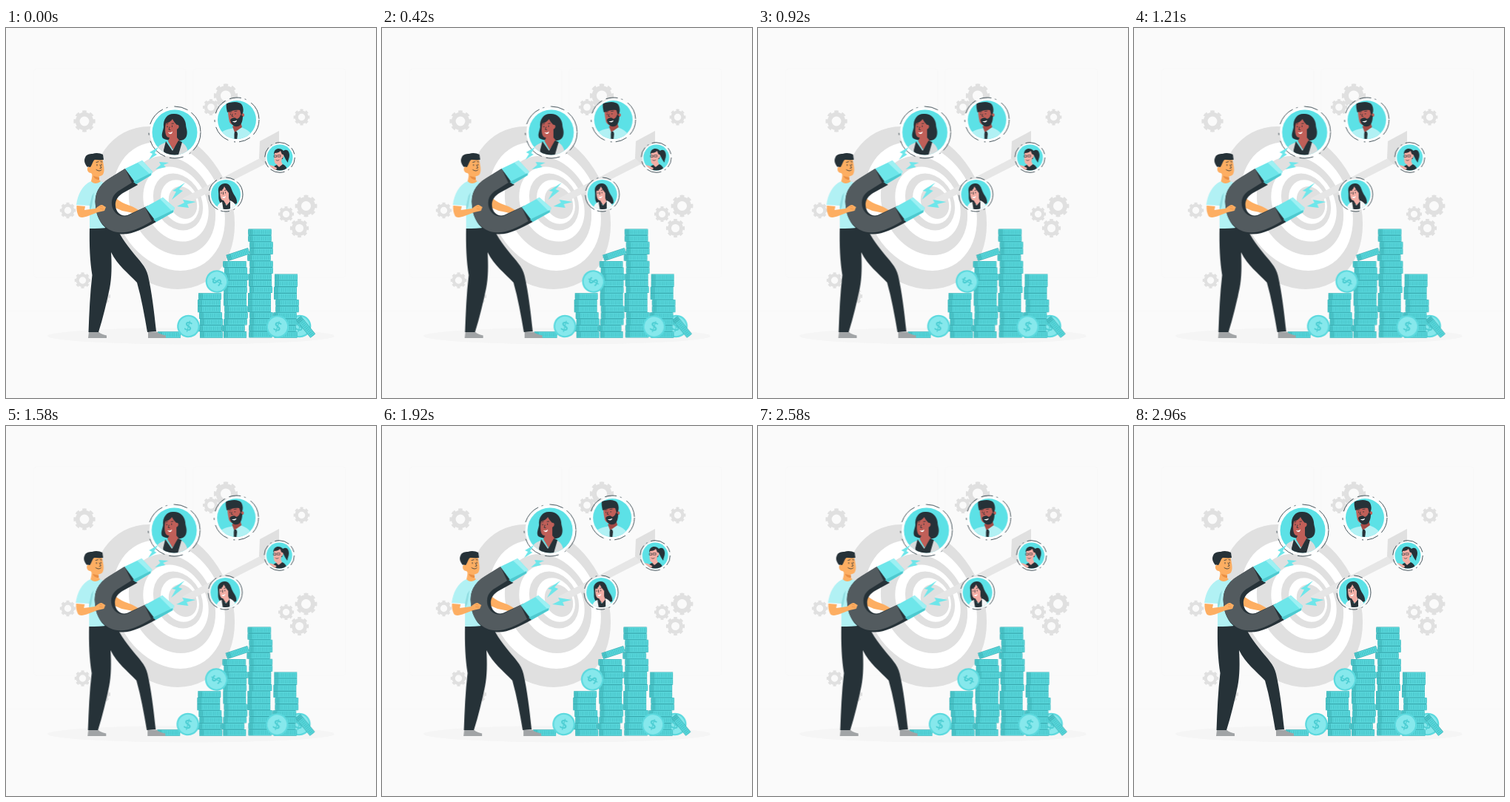
Animation of 500 by 500 pixels, one loop 3000 ms. Source, as an HTML page without scripts:

```html
<!DOCTYPE html>
<html lang="en">
<head>
<meta charset="utf-8">
<title>Attracting customers</title>
<style>
html, body { margin: 0; width: 100%; height: 100%; overflow: hidden; background: #fafafa; }
svg { display: block; width: 100%; height: 100%; }
.shake { animation: shake 3s cubic-bezier(.36, .07, .19, .97) infinite; }
@keyframes shake {
  0%, 100% { transform: translateX(0); }
  10%, 90% { transform: translateX(-.67px); }
  20%, 80% { transform: translateX(1.33px); }
  30%, 50% { transform: translateX(-2.67px); }
  40%, 60% { transform: translateX(2.67px); }
  70% { transform: translateX(-2.67px); animation-timing-function: linear; }
}
.grey { fill: #e0e0e0; }
.white { fill: #fff; }
.dark { fill: #263238; }
.skin { fill: #fdae62; }
.brown { fill: #c05f58; }
.pink { fill: #f3aea5; }
.cyan { fill: #5ce1e6; }
.pale { fill: #b1f1f4; }
.tip { fill: #6ee6ea; }
.gloss { fill: #9df0f3; }
.shade { fill: #4dc9cf; }
.line { fill: none; stroke: #263238; stroke-width: .8; stroke-linecap: round; }
.orbit { fill: none; stroke: #37474f; stroke-width: .9; }
.face { fill: #86e8ec; stroke: #5bd9de; stroke-width: 2.2; }
.sign { font: 600 19px "Open Sans", Arial, sans-serif; fill: #4dced3; text-anchor: middle; }
.rim { stroke: #36a8ae; stroke-width: 8.65; }
.side { stroke: #5ad8dc; stroke-width: 7.5; }
.ticks { stroke: #41bdc2; stroke-width: 5.4; stroke-dasharray: .8 1.7; }
.end { stroke: #278e94; stroke-opacity: .25; stroke-width: 7.5; stroke-dasharray: 6 99; }
</style>
</head>
<body>
<svg viewBox="0 0 500 500" xmlns="http://www.w3.org/2000/svg">
<defs>
  <g id="gear" fill="none" stroke="#e0e0e0">
    <circle r="6.4" stroke-width="4"/>
    <circle r="8.8" stroke-width="2.6" pathLength="16" stroke-dasharray="1.1 .9" stroke-dashoffset=".55"/>
  </g>
  <ellipse id="ring" rx="90" ry="115" transform="rotate(-28)"/>
  <g id="coin">
    <circle class="face" r="14.2"/>
    <text class="sign" y="6.8">$</text>
  </g>
  <path id="rows" d="M260 362.6h31m-32 8.65h31m-31 8.65h31m-29 8.65h31m-30 8.65h31m-33 8.65h31m-29 8.65h31
    M293.5 319.3h31m-29.5 8.65h31m-29.5 8.65h31m-33 8.65h31m-31 8.65h31m-31.5 8.65h31m-31 8.65h31m-29.5 8.65h31m-31 8.65h31m-32 8.65h31m-34 8.65h31m-28.5 8.65h31
    M327.5 275.8h31m-31 8.65h31m-29 8.65h31m-31 8.65h31m-34 8.65h31m-28 8.65h31m-31 8.65h31m-32.5 8.65h31m-31 8.65h31m-30 8.65h31m-33 8.65h31m-31 8.65h31m-31 8.65h31m-28.5 8.65h31m-31 8.65h31m-32 8.65h31m-31 8.65h31
    M363 336.7h31m-31 8.65h31m-32 8.65h31m-31 8.65h31m-28.5 8.65h31m-31 8.65h31m-34 8.65h31m-30 8.65h31m-33 8.65h31m-29 8.65h31
    M205 414.5h31"/>
  <path id="bar" d="M-15.5 0h31"/>
  <g id="slab">
    <use href="#bar" class="rim"/>
    <use href="#bar" class="side"/>
    <use href="#bar" class="ticks"/>
    <use href="#bar" class="end"/>
  </g>
  <clipPath id="c1"><circle cx="228" cy="141" r="30.5"/></clipPath>
  <clipPath id="c2"><circle cx="312" cy="124" r="26"/></clipPath>
  <clipPath id="c3"><circle cx="370" cy="175" r="17.5"/></clipPath>
  <clipPath id="c4"><circle cx="297" cy="225" r="20"/></clipPath>
</defs>

<!-- backdrop -->
<g fill="none" stroke="#f6f6f6" stroke-width=".6">
  <rect x="37.5" y="54.5" width="205.500" height="283" rx="5"/>
  <rect x="253" y="54.5" width="206" height="283" rx="5"/>
  <path d="M0 382.5h500"/>
</g>
<ellipse cx="250" cy="416.2" rx="194" ry="11.3" fill="#f5f5f5"/>
<use href="#gear" transform="translate(106 126) scale(1.45)"/>
<use href="#gear" transform="translate(297 91.5) scale(1.6)"/>
<use href="#gear" transform="translate(277 107) scale(1.1)"/>
<use href="#gear" transform="translate(399.5 120.5) scale(1.08)"/>
<use href="#gear" transform="translate(405.5 240.5) scale(1.48)"/>
<use href="#gear" transform="translate(378.5 251.5) scale(1.05)"/>
<use href="#gear" transform="translate(396.5 270.5) scale(1.25)"/>
<use href="#gear" transform="translate(83.5 246.5) scale(1.06)"/>
<use href="#gear" transform="translate(103.5 341) scale(1.07)"/>
<use href="#gear" transform="translate(129.5 362.5) scale(1.15)"/>

<!-- target and arrow -->
<use href="#ring" class="grey" transform="translate(213 243)"/>
<use href="#ring" class="white" transform="translate(220 241) scale(.79)"/>
<use href="#ring" class="grey" transform="translate(224.500 240) scale(.61)"/>
<use href="#ring" class="white" transform="translate(229.500 238) scale(.46)"/>
<use href="#ring" class="grey" transform="translate(232.500 235) scale(.35)"/>
<use href="#ring" class="white" transform="translate(235 235) scale(.27)"/>
<use href="#ring" class="grey" transform="translate(239 236) scale(.2)"/>
<path d="M239 230 347 174l5 9-109 55z" fill="#e6e6e6"/>
<path class="grey" d="M343 153 369 139v25l-17 21-10-9z"/>

<g class="shake">
  <!-- money -->
  <use href="#coin" transform="translate(397 403) rotate(15)"/>
  <g fill="none">
    <use href="#rows" class="rim"/>
    <use href="#rows" class="side"/>
    <use href="#rows" class="ticks"/>
    <use href="#rows" class="end"/>
    <use href="#slab" transform="translate(313.5 306) rotate(-18)"/>
    <use href="#slab" transform="translate(405 404) rotate(51)"/>
  </g>
  <use href="#coin" transform="translate(246.5 403) rotate(15)"/>
  <use href="#coin" transform="translate(285 342.5) rotate(-62)"/>
  <use href="#coin" transform="translate(367 403.5) rotate(18)"/>

  <!-- woman with a bob -->
  <circle class="white" cx="228" cy="141" r="33.5"/>
  <circle class="orbit" cx="228" cy="141" r="35" stroke-dasharray="27 5 2 9 19 6 30 8 3 12"/>
  <circle class="cyan" cx="228" cy="141" r="30.5"/>
  <g clip-path="url(#c1)">
    <path class="dark" d="M212 149c-3-4 0-9 1-15-1-11 5-18 13-18 9-1 16 5 17 14 0 5 3 9 1 16-2 6-9 7-14 6-6 0-13 0-18-3z"/>
    <path class="brown" d="M216 129c4-1 7-3 9-6 2 4 4 6 6 8 3-1 4 4 0 6v11l4 5-9 12-7-12 2-5c-6 1-7-10-5-19z"/>
    <path d="M202 174c0-12 4-16 15-20l8 11 9-12c8 3 12 8 13 21z" fill="#d9dcdd"/>
    <path class="dark" d="m216 153 9 13 8-14 5 2-6 21h-18l-1-10z"/>
    <path class="line" d="M218 132.500v1.500m6.500-2v1.500M217 130l2-.8m5 0 2.500-.3m-5.500 5-1 3.500 2 .3"/>
    <path class="white" d="M219 141c3 1 5 0 6-1.500 0 4-4 5-6 1.500z"/>
  </g>

  <!-- bearded man -->
  <circle class="white" cx="312" cy="124" r="28.5"/>
  <circle class="orbit" cx="312" cy="124" r="30" stroke-dasharray="22 6 16 5 2 8 25 7 3 9"/>
  <circle class="cyan" cx="312" cy="124" r="26"/>
  <g clip-path="url(#c2)">
    <path class="pale" d="M286 152c1-10 7-14 18-16l14-2c9 4 15 7 16 18z"/>
    <path d="m306 133 3 8 10-7-2-7z" fill="#a34a45"/>
    <path class="brown" d="M300 112c5-2 12-3 18-2l1 16c-3 7-14 8-17 1-1-5-2-10-2-15z"/>
    <circle class="brown" cx="319.500" cy="117.500" r="2.600"/>
    <path class="dark" d="M299 114c-1-5-2-9-1-12 6-2 17-4 21 2 2 4 2 8 1 11l-2 3-2-7c-6-1-11 1-17 3z"/>
    <path class="dark" d="M303 124c2-3 7-4 9-1 3-1 4-3 5-6l3 2c0 7-2 13-7 14-5 1-9-3-10-9z"/>
    <path class="white" d="M306 126c2 0 5-.5 6-1.500 0 3-4 4-6 1.500z"/>
    <path class="line" d="M303.500 116v1m6.500-1.500v1m-8-3 3-.5m4-.5 3-.3m-6 4-1 3 2 .2"/>
    <path class="dark" d="m309 140 3 0 1 3-1 9h-3.500l0-9z"/>
  </g>

  <!-- woman with a ponytail -->
  <circle class="white" cx="370" cy="175" r="19"/>
  <circle class="orbit" cx="370" cy="175" r="20.3" stroke-dasharray="14 4 2 5 20 4 9 6"/>
  <circle class="cyan" cx="370" cy="175" r="17.5"/>
  <g clip-path="url(#c3)">
    <path class="dark" d="M362 170c0-8 9-9 13-4 4-3 8 0 8 6 0 4-2 6-2 10-3-3-4-7-6-10l-1 5-5 1z"/>
    <path class="pink" d="M363 169c4 0 6-1 8-3l2 5c3-1 3 4 0 5l-1 4 2 5-7 5-1-6c-4 0-4-7-3-15z"/>
    <path class="dark" d="M360 194c0-5 2-8 6-9l3 3 5-4c4 2 6 5 7 10z"/>
    <path class="pink" d="m355 185 5 1 6 3-1 3-10-3z"/>
    <path class="line" stroke-opacity=".8" d="M362.500 172h3v2.500h-3zm5-.3h3.500v2.500h-3.500zM365 178.500c1 1 3 1 4-.2"/>
  </g>

  <!-- woman with long hair -->
  <circle class="white" cx="297" cy="225" r="21.5"/>
  <circle class="orbit" cx="297" cy="225" r="23" stroke-dasharray="18 5 2 6 12 4 24 6"/>
  <circle class="cyan" cx="297" cy="225" r="20"/>
  <g clip-path="url(#c4)">
    <path class="dark" d="M287 221c-1-7 4-11 9-11 7 0 8 6 10 11 2 5 7 9 6 16l-9 3-13-3c-4-5-2-10-3-16z"/>
    <path class="pink" d="M289 220c4-1 5-3 6-6 2 4 4 6 6 9v7l2 5-4 6-5-8c-4 0-5-6-5-13z"/>
    <path d="M285 248c0-8 2-11 7-13l6 7 5-9c6 3 9 6 9 15z" fill="#f4f6f6"/>
    <path class="dark" d="m292 235 6 5 5-6 0 13h-9z"/>
    <path class="line" d="M291 222.500v1m5.500-1.500v1m-6.500-3 2-.6m3.500 0 2-.6m-4 3v3"/>
    <path class="white" d="M292 228.500c3 0 4-1 5-2 0 3-3 5-5 2z"/>
  </g>

  <!-- sparks -->
  <g class="tip">
    <path d="m242 209-17 11 5 1-6 11 15-12-5-2z"/>
    <path d="m257 235-18-3 2 4-10 5 16 2-2-5z"/>
    <path d="m220 182-13-1 2 4-7 6 14-3-3-3z"/>
    <path d="m206 161-12 7 4 2-5 8 11-7-3-2z"/>
  </g>

  <!-- man -->
  <path d="M112 410.5c5 1 9 0 13 0 3 3 7 4 11 5v3.500h-25zM192 410.5c4 1 8 0 12 0 3 3 8 4 12 5v3.500h-24z" fill="#a1a4a6"/>
  <path class="dark" d="M113 269c8 1 21-1 36-3 3 13 13 25 23 38 8 10 17 18 20 31 5 22 8 47 11 75l-12 1c-4-23-8-46-14-67-12-13-26-23-35-41 1 17 1 35-2 49-4 19-9 40-15 59h-13.500c1-27 2-52 5-77-3-19-4-39-3.500-65z"/>
  <path class="skin" d="M147 228c5 6 14 10 23 13 4 2 8 4 13 8l-6 2-20-4-14-6z"/>
  <path class="pale" d="M115 207c5-1 9 0 13 0 9 4 14 11 21 20l-6 13-5-4c0 12 1 22 2 33-9 2-18 2-27 2v-31l-18-1c2-14 8-27 20-32z"/>
  <path d="m113 240 3-13 3-5-3 19-3 6z" fill="#8fdde1"/>
  <path class="skin" d="m116 195 10 5c-1 4 0 6 2 7-4 4-10 4-13 0 1-4 2-8 1-12z"/>
  <path d="m118 200 8 2v3c-4 0-7-2-8-5z" fill="#e98e43"/>
  <path class="skin" d="M112 182c2-8 18-11 19-2 1 6 3 13 0 18-3 4-13 3-16-2-5 0-7-7-3-9z"/>
  <path class="dark" d="M114 188c-1 0-3-1-4 0-4-5-5-9-3-13 1-4 6-5 10-5 5-2 10-1 14 1l1 7c-4 1-8 0-12 0-3 2-3 6-6 10z"/>
  <path class="line" d="M123 184.500v1.500m6-2v1.500m-7-4 3-.8m3 0 2 .3m-3 4 2 4-2 .5m-5 2c3 2 5 2 7 .2"/>

  <!-- magnet -->
  <path class="dark" d="m161 190-21 13c-15 9-21 22-19 37 1 19 13 36 31 38 16 3 32-6 51-16l-11-22-28 13c-9 2-15-4-16-12-1-9 4-14 10-18l20-11z"/>
  <path d="m161 190-21 13c-15 9-21 22-19 37 1 19 13 34 30 36 14 2 29-5 46-15l-9-19-24 12c-12 3-20-6-21-15-1-10 4-16 11-20l16-10z" fill="#535b5f"/>
  <path class="tip" d="m161 190 23-11 14 15-2 5-20 12z"/>
  <path class="gloss" d="m184 179 14 15-2 5-18-17z"/>
  <path class="shade" d="m172 208 24-12v3l-20 12z"/>
  <path class="tip" d="m188 242 24-13 16 14-2 6-23 13z"/>
  <path class="gloss" d="m212 229 16 14-2 6-18-18z"/>
  <path class="shade" d="m199 259 27-13v3l-23 13z"/>

  <!-- near arm -->
  <path class="skin" d="M95.500 240 107 241l-1 5 15-2c3-3 6-5 9-5l5 3-2 5-9 2-13 5c-5 2-11 3-13 0-2-4-3-9-2.500-14z"/>
  <path d="m127 241 4 1m-4 2 5 1" fill="none" stroke="#e98e43" stroke-width=".7"/>
</g>
</svg>
</body>
</html>
```
